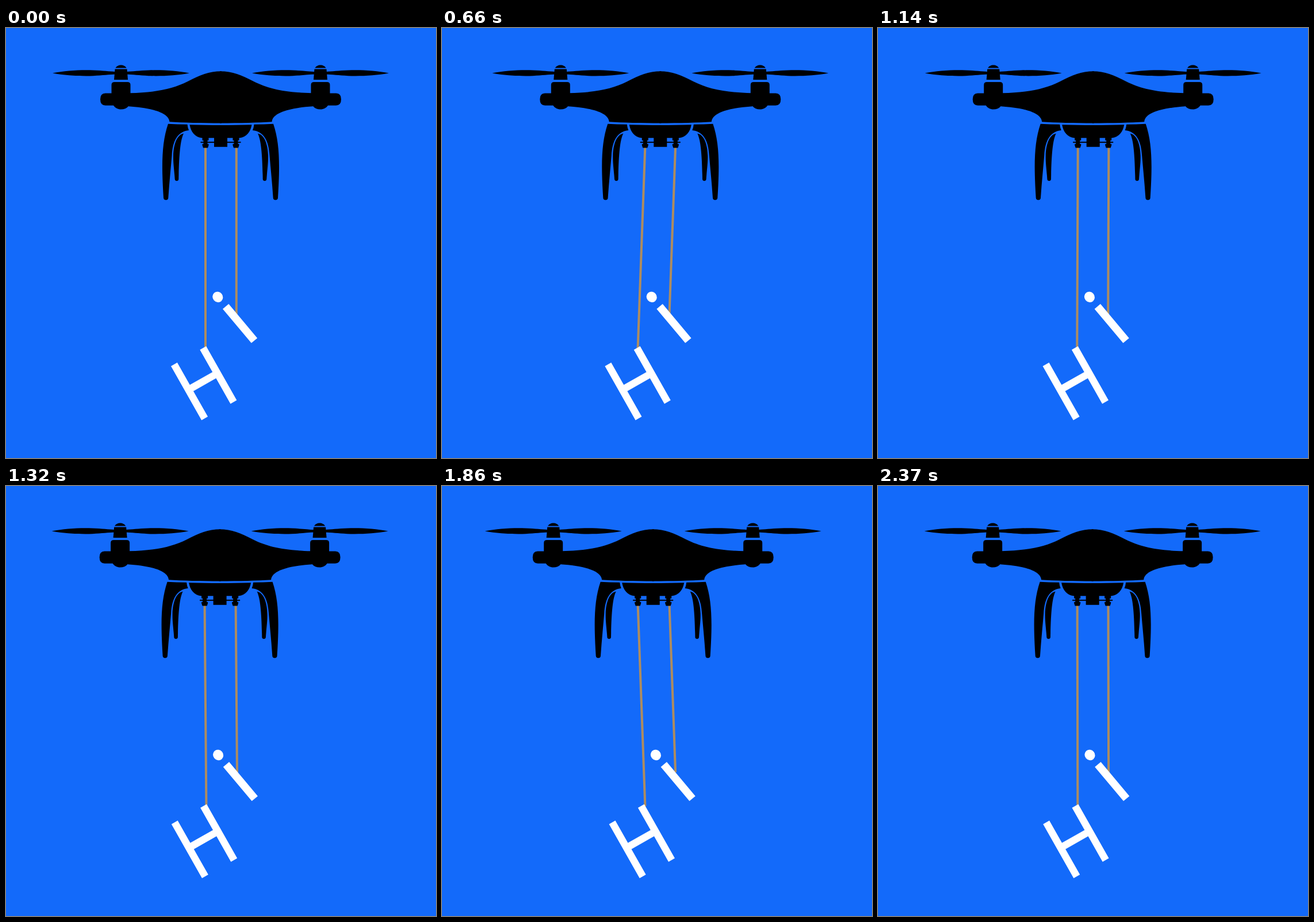
Animation of 748 by 748 pixels, one loop 2.4 s. Source, as an HTML page:

```html
<!DOCTYPE html>
<html lang="en">
<head>
<meta charset="utf-8">
<title>Hi</title>
<style>
  html, body { margin: 0; width: 100%; height: 100%; overflow: hidden; background: #136afa; }
  svg { display: block; width: 100%; height: 100%; }
</style>
</head>
<body>
<svg viewBox="0 0 748 748" role="img" aria-label="A drone carrying the word Hi">
  <defs>
    <path id="blade" d="M81 78.5C103 74.2 131 72.6 152 73.6C168 74.3 180 75.6 191 76.2V80.6C180 81 168 82.4 152 83.2C131 84 103 82.8 81 78.5Z"/>
    <g id="half">
      <use href="#blade"/>
      <use href="#blade" transform="matrix(-1 0 0 1 400 0)"/>
      <!-- rotor hub, motor and arm end -->
      <path d="M190.5 69.5C192 66.5 196 64.5 200 64.5S208 66.5 209.5 69.5Z"/>
      <path d="M189.5 71.5H210.5L212 90H188Z"/>
      <path d="M183.5 114V99Q183.5 94 188.5 94H211.5Q216.5 94 216.5 99V136H213C210 139.8 205.5 141.5 200 141.5S190 139 187 134.7H173Q164 134.7 164 124T173 113.5H183.5Z"/>
      <!-- hull -->
      <path d="M215 113.3C262 112 290 106 316 93C338 82 352 75.3 375 75.3V165.5C340 165.5 308 164.5 284.5 163.2C283 145 246 138.5 213 136.3Z"/>
      <!-- front leg, back leg -->
      <path d="M282 166.7Q298 167.5 315.5 167.8Q316 173 318 178C299 180 290 195 288.5 222C286.5 246 284 270 282.3 295.5Q282 299.3 278.2 299.3T274 295.5C270.5 240 270.5 200 282 166.7Z"/>
      <path d="M309 183.5C303 196 301 222 300.3 263Q300 266 297 266T293.7 263C292.5 245 290.7 236 291 222C291.5 203 297 186 309 183.5Z"/>
      <!-- belly and rope bolt -->
      <path d="M319.5 168.2Q345 169 375 169V191.3H341C329 190 321.5 181 319.5 168.2Z"/>
      <path d="M341.5 190H352.5V195.5H350.5V197.8H375V199.8H350.5V201.8H352.5V204L351 208.5H343L341.5 204V201.8H343.5V199.8H338.5V197.8H343.5V195.5H341.5Z"/>
    </g>
  </defs>
  <rect width="748" height="748" fill="#136afa"/>
  <g id="ropes" stroke="#ad8c60" stroke-width="4">
    <line/>
    <line/>
  </g>
  <g id="drone">
    <use href="#half"/>
    <use href="#half" transform="matrix(-1 0 0 1 747 0)"/>
    <rect x="362" y="190" width="23" height="16.8"/>
  </g>
  <g id="word" fill="#fff">
    <path transform="translate(287 588.2) rotate(-29.5)" d="M0 0H12.5V44.5H57.8V0H70.3V108H57.8V57H12.5V108H0Z"/>
    <g transform="translate(377 488.7) rotate(-40)">
      <rect width="13.5" height="77.5"/>
      <ellipse cx="6.7" cy="-21.5" rx="8.8" ry="9.5"/>
    </g>
  </g>
</svg>
<script>
  const LOOP = 2400, STEP = 30, TILT = 0.0404;
  const drone = document.getElementById('drone');
  const word = document.getElementById('word');
  const lines = document.querySelectorAll('#ropes line');
  const ropes = [
    { x: 347, top: 206, end: 557 },
    { x: 400.8, top: 206, end: 498 }
  ];

  // Triangle wave: 0, 1, 0, -1 at the quarters of the loop
  function wave(p) {
    return Math.abs((p * 4 + 3) % 4 - 2) - 1;
  }

  function shift(el, x) {
    el.setAttribute('transform', `translate(${x.toFixed(3)} 0)`);
  }

  function draw(ms) {
    const t = Math.floor((ms % LOOP) / STEP) * STEP;
    const sway = wave(t / LOOP);
    shift(drone, 7 * sway);
    shift(word, -4 * sway);
    // Each rope swings about its middle
    ropes.forEach(({ x, top, end }, i) => {
      const lean = sway * TILT * (end - top) / 2;
      const at = { x1: x + lean, y1: top, x2: x - lean, y2: end };
      for (const k in at) lines[i].setAttribute(k, at[k]);
    });
  }

  const start = performance.now();
  function tick() {
    draw(performance.now() - start);
    requestAnimationFrame(tick);
  }
  draw(0);
  requestAnimationFrame(tick);
</script>
</body>
</html>
```
